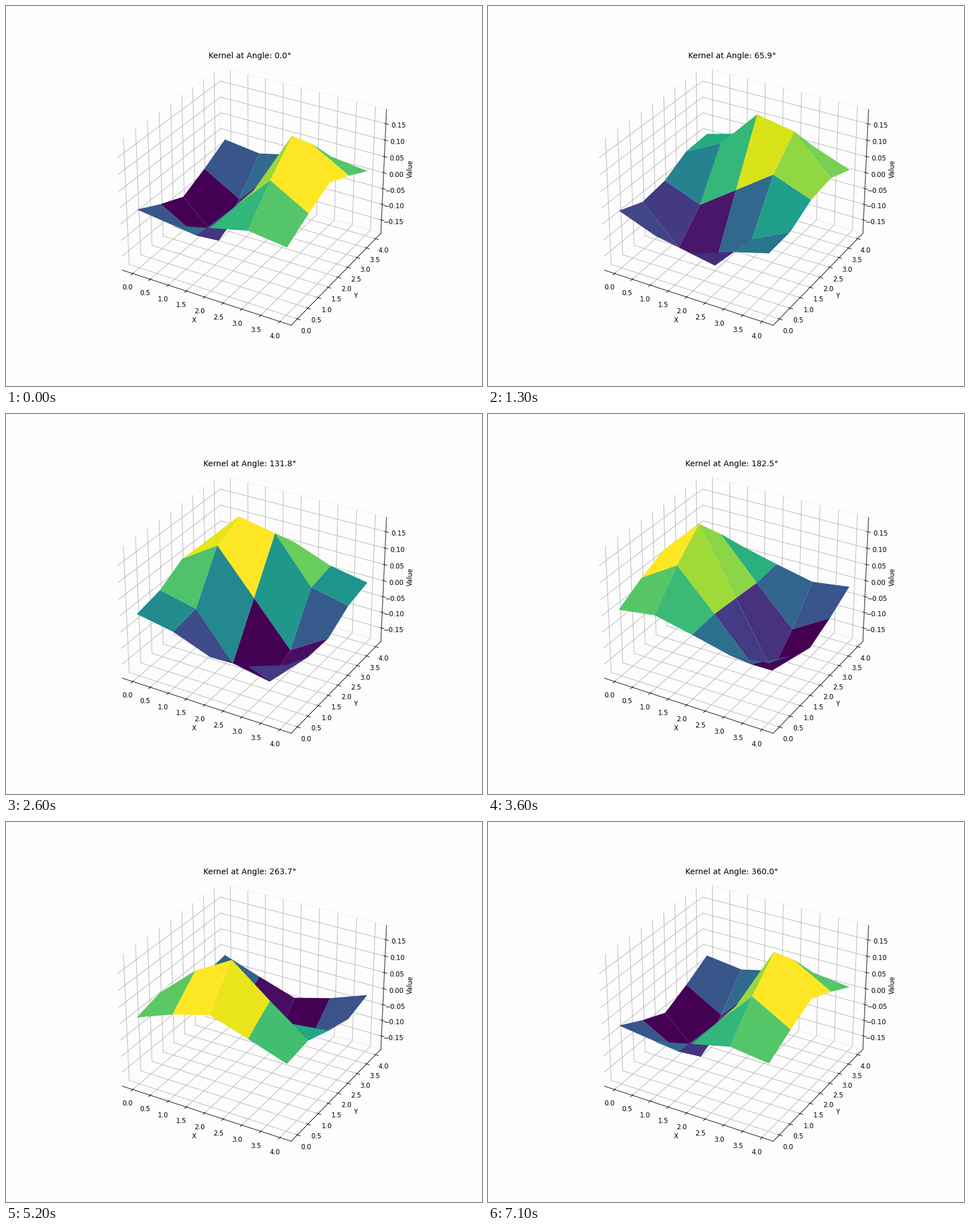
These frames come from a looping animation (837x669 px, 7.2 s). A matplotlib script:

```python
import numpy as np
import matplotlib.pyplot as plt
from matplotlib.animation import FuncAnimation

FRAMES = 72
INTERVAL = 100
PAPER = "#fdfdfd"

# Gaussian derivatives on a 5 x 5 grid, steered by angle
ticks = np.arange(5)
X, Y = np.meshgrid(ticks, ticks)
dx, dy = X - 2, Y - 2
bell = np.exp(-(dx**2 + dy**2) / 2) / np.pi
grad_x, grad_y = dx * bell, dy * bell
peak = grad_x.max()
angles = np.linspace(0, 360, FRAMES)

fig = plt.figure(figsize=(10.009, 8), dpi=83.625, facecolor=PAPER)
ax = fig.add_subplot(projection="3d", facecolor=PAPER)
fig.subplots_adjust(left=0.125, right=0.9, bottom=0.11, top=0.9)
ax.view_init(elev=30, azim=-60)

for axis in (ax.xaxis, ax.yaxis, ax.zaxis):
    axis.pane.fill = False

# 5 % data margin widened by 1/48 on each side
pad = 0.2 + 4.4 / 48
ax.set_xticks(np.arange(0, 4.1, 0.5))
ax.set_yticks(np.arange(0, 4.1, 0.5))
ax.set_xlim(-pad, 4 + pad)
ax.set_ylim(-pad, 4 + pad)
ax.set_zlim(-peak, peak)
ax.set_xlabel("X")
ax.set_ylabel("Y")
ax.set_zlabel("Value")
title = ax.set_title("", y=1.0, pad=15)

surface = None


def update(i):
    global surface
    if surface is not None:
        surface.remove()
    t = np.radians(angles[i])
    Z = np.cos(t) * grad_x + np.sin(t) * grad_y
    surface = ax.plot_surface(X, Y, Z, cmap="viridis", edgecolor="none")
    title.set_text(f"Kernel at Angle: {angles[i]:.1f}°")
    return surface, title


anim = FuncAnimation(fig, update, frames=FRAMES, interval=INTERVAL,
                     repeat=True, repeat_delay=0, blit=False)
plt.show()
```
